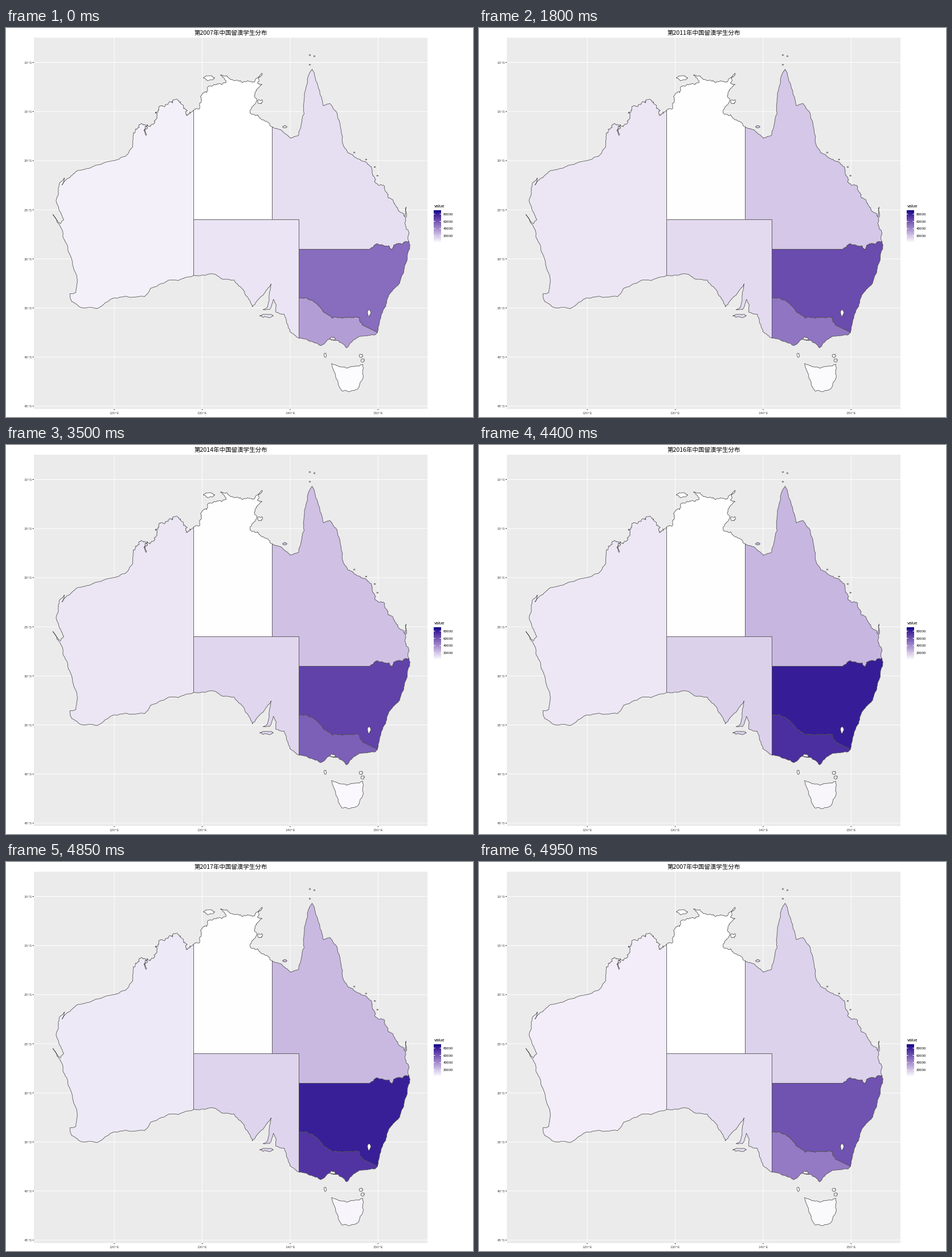
A matplotlib script for the animation above (5000 ms loop, 820 by 683 pixels).

```python
import numpy as np
import matplotlib.pyplot as plt
from matplotlib.animation import FuncAnimation
from matplotlib.patches import Polygon, Rectangle

W, H, DPI = 820, 683, 64
PX = 72 / DPI  # points per pixel
EDGE, PANEL = "#505050", "#EBEBEB"
rng = np.random.default_rng(7)


def lab_ramp(v):
    """White to dark blue, blended in CIE Lab; v in 0..1."""
    v = np.asarray(v, float)
    fy = (116 - 85.25 * v) / 116
    f = np.stack([fy + 50.5 * v / 500, fy, fy + 68.7 * v / 200], -1)
    xyz = np.where(f > 6 / 29, f ** 3, 3 * (6 / 29) ** 2 * (f - 4 / 29))
    xyz = xyz * [0.95047, 1, 1.08883]
    m = np.array([[3.2406, -1.5372, -0.4986],
                  [-0.9689, 1.8758, 0.0415],
                  [0.0557, -0.2040, 1.0570]])
    c = np.clip(xyz @ m.T, 0, 1)
    return np.clip(np.where(c > 0.0031308, 1.055 * c ** (1 / 2.4) - 0.055, 12.92 * c), 0, 1)


def coast(amp, *xy):
    """Path through key points with a fractal, shore-like wobble."""
    p = np.array(xy, float).reshape(-1, 2)
    for _ in range(5):
        d = np.diff(p, axis=0)
        size = np.hypot(d[:, 0], d[:, 1])
        off = rng.uniform(-amp, amp, len(d)) * (size > 1.5) * np.minimum(1, 14 / size)
        out = np.empty((2 * len(p) - 1, 2))
        out[::2] = p
        out[1::2] = p[:-1] + d / 2 + off[:, None] * np.stack([-d[:, 1], d[:, 0]], 1)
        p = out
    return p


def isle(x, y, rx, ry, amp=0.2):
    a = np.linspace(0, 2 * np.pi, 7)
    return coast(amp, *np.stack([x + rx * np.cos(a), y + ry * np.sin(a)], 1).ravel())


def join(*parts):
    return np.vstack([np.atleast_2d(p) for p in parts])


# coasts and borders, each shared by the regions that touch it
kimberley = coast(0.4, 329, 144, 316, 153, 311, 138, 297, 125, 285, 131, 268, 141, 263, 159,
                  247, 169, 245, 188, 237, 167, 223, 185)
west = coast(0.1, 223, 185, 222, 208, 209, 225, 190, 232, 125, 250, 106, 265, 98, 275, 102, 263,
             93, 273, 88, 306, 101, 336, 95, 343, 82, 327, 97, 352, 112, 398, 124, 435,
             122, 464, 112, 466, 115, 480, 130, 490, 159, 492)
south = coast(0.09, 159, 492, 187, 474, 243, 471, 254, 456, 284, 443, 302, 443, 329, 434)
north = coast(0.25, 329, 144, 338, 142, 341, 120, 358, 101, 386, 95, 376, 82, 396, 90, 433, 95,
              449, 79, 441, 96, 449, 99, 437, 116, 436, 134, 428, 146, 452, 161, 467, 173)
gulf = coast(0.1, 467, 173, 482, 178, 499, 193, 513, 188, 523, 150, 525, 110, 531, 82, 537, 72,
             543, 90, 557, 136, 568, 132, 579, 146, 588, 180, 591, 203, 597, 213)
reef = coast(0.2, 597, 213, 637, 240, 647, 270, 664, 277, 671, 298, 697, 325, 700, 331,
             702, 314, 702, 352, 707, 374)
tweed = join((514, 388), coast(0.2, 638, 388, 646, 381, 672, 382, 677, 389, 684, 379, 707, 374))
east = coast(0.1, 707, 374, 709, 381, 698, 427, 691, 447, 676, 463, 661, 498, 652, 534)
murray = join(coast(0.15, 514, 474, 533, 477, 548, 487, 572, 509, 620, 508, 625, 521), (652, 534))
bass = coast(0.12, 514, 544, 537, 550, 553, 557, 567, 546, 582, 548, 597, 561, 620, 541,
             648, 538, 652, 534)
bight = coast(0.1, 329, 434, 362, 431, 378, 440, 400, 442, 418, 462, 432, 489, 465, 449,
              459, 489, 451, 494, 462, 494, 469, 476, 474, 486, 473, 498, 488, 502,
              498, 533, 514, 544)
tasman = coast(0.12, 571, 589, 598, 597, 626, 590, 627, 612, 618, 632, 603, 638, 590, 637,
               579, 615, 571, 589)

SHAPES = {
    "WA": [join(kimberley, west, south)],
    "NT": [join(north, (467, 336), (329, 336)), isle(356, 87, 10, 4), isle(446, 129, 4, 4, 0.4)],
    "QLD": [join(gulf, reef, tweed[::-1], (514, 336), (467, 336)), isle(489, 173, 4, 2)],
    "SA": [join(bight, (514, 336), (329, 336)), isle(457, 505, 12, 3)],
    "NSW": [join(tweed, east, murray[::-1])],
    "VIC": [join(murray, bass[::-1])],
    "TAS": [tasman, isle(560, 574, 2, 4), isle(623, 575, 3, 3, 0.4), isle(626, 583, 3, 3, 0.4)],
}

# colour-scale position of each region at a few key years
KEY_YEARS = [2007, 2009, 2013, 2016, 2017]
LEVELS = {
    "WA": [.056, .09, .099, .09, .09],
    "NT": [0, .002, .002, .003, .003],
    "QLD": [.122, .20, .218, .26, .31],
    "SA": [.10, .137, .138, .17, .18],
    "NSW": [.57, .74, .66, .867, 1],
    "VIC": [.37, .554, .505, .79, .95],
    "TAS": [.015, .02, .02, .033, .045],
}

fig = plt.figure(figsize=(W / DPI, H / DPI), dpi=DPI, facecolor="white")
ax = fig.add_axes([0, 0, 1, 1])
ax.axis("off")


def line(x, y, color, z=1):
    ax.plot(x, y, color=color, lw=PX, solid_capstyle="butt", snap=False, zorder=z)


def label(x, y, s, size, color="black", ha="left", va="center_baseline", font="Liberation Sans"):
    return ax.text(x, y, s, fontsize=size * PX, color=color, ha=ha, va=va, family=font, zorder=6)


def land(ring, z, fill="white"):
    return ax.add_patch(Polygon(ring, closed=True, fc=fill, ec=EDGE, lw=0.8 * PX,
                                joinstyle="round", snap=False, zorder=z))


# panel, grid and axes
ax.add_patch(Rectangle((48.5, 16.5), 691, 652, fc=PANEL, ec="none", zorder=0))
for k in range(4):
    x = 189.6 + 154.4 * k
    line([x, x], [16.5, 668.5], "white")
    line([x, x], [668.5, 670.5], "#333333")
    label(x, 676, f"{120 + 10 * k}°E", 6.4, "#4D4D4D", "center")
for k in range(8):
    y = 60 + 86.2 * k
    line([48.5, 739.5], [y, y], "white")
    line([46, 48.5], [y, y], "#333333")
    label(45, y + 0.5, f"{10 + 5 * k}°S", 6.4, "#4D4D4D", "right")

# regions, then the enclave, the bay and small islets
patches = {name: [land(r, 3) for r in rings] for name, rings in SHAPES.items()}
land(isle(637, 500, 3, 6), 4)
land(isle(573, 545, 5, 3), 4, PANEL)
for x, y in [(533, 47), (541, 49), (533, 64), *(reef[8:70:16] + [5, -3])]:
    land(isle(x, y, 1.3, 0.9), 4)

# legend
label(751, 312, "value", 7.8)
bar = lab_ramp(np.linspace(1, 0, 120))[:, None, :]
ax.imshow(bar, extent=(750.5, 763.5, 376.5, 319.5), aspect="auto",
          interpolation="bilinear", zorder=2)
for k in range(4):
    y = 326.3 + 12.7 * k
    line([750.5, 753], [y, y], "white", 3)
    line([761, 763.5], [y, y], "white", 3)
    label(767, y, str(80000 - 20000 * k), 6.3)

title = label(394, 11.3, "", 10.5, ha="center", va="baseline", font="Noto Sans CJK JP")
ax.set_xlim(-0.5, W - 0.5)
ax.set_ylim(H - 0.5, -0.5)

YEARS = 11
STARTS = [0, 9] + [19 + 9 * k for k in range(YEARS - 1)]


def progress(i):
    """Year index being left and how far the blend to the next one is."""
    s = max(k for k in range(YEARS) if STARTS[k] <= i)
    steps = 4 if s < 2 else 3
    n = i - (STARTS[s + 1] - steps) + 1
    if n <= 0:
        return s, 0.0
    if s < YEARS - 1 and n < steps:
        n = 1  # the blend holds its first step, then jumps
    return s, n / (steps + 1)


def update(i):
    s, p = progress(i)
    pair = [2007 + s, 2007 + (s + 1) % YEARS]
    for name, keys in LEVELS.items():
        a, b = np.interp(pair, KEY_YEARS, keys)
        color = lab_ramp(a + (b - a) * p)
        for patch in patches[name]:
            patch.set_facecolor(color)
    title.set_text(f"第{pair[p >= 0.5]}年中国留澳学生分布")
    return [title]


anim = FuncAnimation(fig, update, frames=100, interval=50, init_func=lambda: update(0),
                     repeat=True, repeat_delay=0, blit=False)
plt.show()
```
